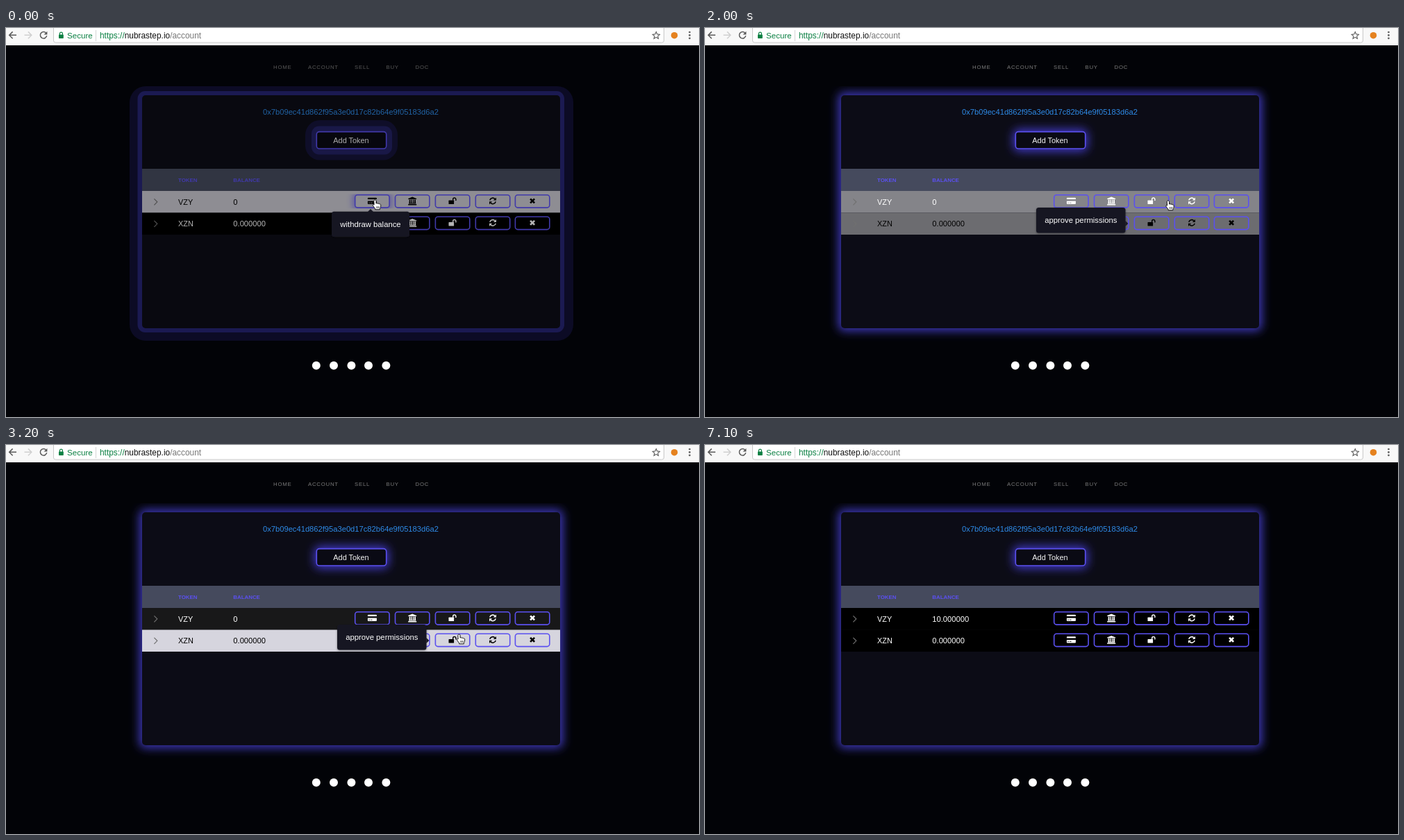
Write an HTML page that moves like this. It is 998x561 px and loops after 7550 ms.

```html
<!DOCTYPE html>
<html lang="en">
<head>
<meta charset="utf-8">
<title>Token account</title>
<style>
  html, body { margin: 0; width: 100%; height: 100%; overflow: hidden; background: #020307; }
  svg { display: block; width: 100%; height: 100%; }
  text { font-family: "Liberation Sans", Arial, sans-serif; white-space: pre; }
</style>
</head>
<body>
<svg id="stage" viewBox="0 0 998 561" xmlns="http://www.w3.org/2000/svg"></svg>
<script>
const LOOP = 7550;
const BLUE = '#5b50f0';
const BTN_X = [502.7, 560.5, 618.4, 676.3, 733.4];
const ROW_Y = [235, 266.5];

const txt = (x, y, s, size, fill, more = '') =>
  `<text x="${x}" y="${y}" font-size="${size}" fill="${fill}" ${more}>${s}</text>`;
const box = (x, y, w, h, r, fill, more = '') =>
  `<rect x="${x}" y="${y}" width="${w}" height="${h}" rx="${r}" fill="${fill}" ${more}/>`;
const dot = (x, y, r, fill) => `<circle cx="${x}" cy="${y}" r="${r}" fill="${fill}"/>`;
const line = (d, color, w, more = '') =>
  `<path d="${d}" fill="none" stroke="${color}" stroke-width="${w}" ${more}/>`;

// Icons are drawn around their own centre and take the row colour.
const ICONS = [
  `<path fill-rule="evenodd" d="M-5.6-4.6H5.6q.9 0 .9.9V3.7q0 .9-.9.9H-5.6q-.9 0-.9-.9V-3.7q0-.9.9-.9ZM-6.5-2.3V0H6.5V-2.3ZM-5.2 2.3v.9h1.8v-.9ZM-2.6 2.3v.9H.2v-.9Z"/>`,
  `<path d="M0-6 6-3.4V-2.4H-6V-3.4ZM-4.6-1.8h1.8V3h-1.8ZM-1.9-1.8h1.4V3h-1.4ZM.7-1.8h1.4V3H.7ZM3-1.8h1.8V3H3ZM-5.2 3.2H5.2V4.2H-5.2ZM-6 4.6H6V6H-6Z"/>`,
  `<rect x="-5.6" y="-.9" width="7.6" height="5.6" rx=".7"/>` +
    line('M.6-.6V-2.3a2.1 2.1 0 0 1 4.2 0V-.3', 'currentColor', 1.4),
  line('M-4.2-1A4.2 4.2 0 0 1 3.2-2.7M4.2 1A4.2 4.2 0 0 1-3.2 2.7', 'currentColor', 1.6) +
    `<path d="M5-5V-.9H.9ZM-5 5V.9H-.9Z"/>`,
  line('M-3-3 3 3M3-3-3 3', 'currentColor', 2.7)
];

function toolbar() {
  return box(0, 0, 998, 25, 0, '#f8f8f8') +
    box(68.5, -8, 879, 29, 3, '#fff', 'stroke="#c9c9c9"') +
    line('M15 10.3H5M9.6 5.4 4.7 10.3 9.6 15.2', '#5a5a5a', 1.5) +
    line('M26.5 10.3H36.5M31.9 5.4 36.8 10.3 31.9 15.2', '#d0d0d0', 1.5) +
    line('M57.6 7.2A4.7 4.7 0 1 0 58.7 11.2', '#5a5a5a', 1.5) +
    `<path d="M59.4 4.8V9.6H54.6Z" fill="#5a5a5a"/>` +
    box(76, 9.6, 6.8, 5.4, .7, '#0b8043') +
    line('M77.4 10V8.2a2 2 0 0 1 4 0V10', '#0b8043', 1.2) +
    txt(88, 14.6, 'Secure', 11.6, '#0b8043') +
    box(129, 3, 1, 16, 0, '#d5d5d5') +
    txt(135, 14.6, '<tspan fill="#0b8043">https://</tspan><tspan fill="#111">nubrastep.io</tspan>/account', 11.9, '#777') +
    line('M936.3 5.6l1.5 3.3 3.6.4-2.7 2.4.8 3.6-3.2-1.9-3.2 1.9.8-3.6-2.7-2.4 3.6-.4Z', '#5a5a5a', 1.1) +
    dot(962.5, 10.7, 4.8, '#e5821f') +
    [6, 10.4, 14.8].map(y => dot(984.5, y, 1.35, '#5a5a5a')).join('');
}

function nav() {
  return [[385, 'HOME'], [435, 'ACCOUNT'], [502, 'SELL'], [547.5, 'BUY'], [589.5, 'DOC']]
    .map(([x, s]) => txt(x, 58.7, s, 7.8, '#7b7b7b', 'letter-spacing=".75"')).join('');
}

function row(i, name, amount) {
  const y = ROW_Y[i], mid = y + 14.8;
  const buttons = BTN_X.map((x, k) =>
    box(x, y + 5.7, 49.4, 18.4, 3.6, 'none', `stroke="${BLUE}" stroke-width="1.6"`) +
    `<g transform="translate(${x + 24.7} ${mid - .4})" fill="currentColor">${ICONS[k]}</g>`).join('');
  return `<g id="row${i}">` +
    `<rect id="fill${i}" x="196" y="${y}" width="602" height="31.5"/>` +
    (i ? '' : `<g id="halo" clip-path="url(#cell)">
       <rect id="haloBlur" y="237" width="56" height="26" rx="6" fill="${BLUE}" opacity=".62" filter="url(#soft)"/>
       <rect id="haloCut" y="240.7" width="49.4" height="18.4" rx="3.6"/></g>`) +
    line(`M213.4 ${y + 11.3}l4.4 4.5-4.4 4.5`, '#707070', 1.2) +
    txt(248, y + 19.6, name, 10.9, 'currentColor') +
    txt(327.3, y + 19.6, amount, 11.2, 'currentColor', `id="amount${i}"`) +
    buttons + '</g>';
}

function card() {
  return box(196, 97, 602, 336, 5, '#0c0c16') +
    txt(370, 125.2, '0x7b09ec41d862f95a3e0d17c82b64e9f05183d6a2', 11.18, '#2e8ae6') +
    `<g class="bands">${box(431, 133, 133, 57.5, 21, '#15143a')}${box(440, 141.5, 116, 41, 11, '#232264')}</g>` +
    `<g class="glow">${box(444, 146, 107, 32, 8, '#4038c4', 'filter="url(#wide)"')}</g>` +
    box(447.3, 149.6, 100.4, 24.4, 4, '#0a0a14', `stroke="${BLUE}" stroke-width="1.6"`) +
    txt(497, 165.6, 'Add Token', 10.9, '#f4f4f4', 'text-anchor="middle"') +
    box(196, 203, 602, 32, 0, '#454a5d') +
    txt(248, 221.7, 'TOKEN', 7.9, BLUE, 'font-weight="bold"') +
    txt(327.3, 221.7, 'BALANCE', 7.9, BLUE, 'font-weight="bold"') +
    row(0, 'VZY', '0') + row(1, 'XZN', '0.000000');
}

function tip(id, x, y, w, label, arrow) {
  return `<g id="${id}">${box(x, y, w, 36.5, 3.5, '#191823', 'filter="url(#drop)"')}` +
    `<path d="${arrow}" fill="#191823"/>` +
    txt(x + w / 2, y + 22.2, label, 11.3, '#fff', 'text-anchor="middle"') + '</g>';
}

const hand = `<g id="hand"><path d="M-2.6-7c1.1 0 1.6.7 1.7 1.7V-1.9c.5-.7 2-.6 2.3.3.6-.7 1.9-.4 2.1.5 1.2-.4 2.2.2 2.2 1.5 0 2.6-.4 3.6-1.3 5V6.8H-2.4V5.6C-3.4 4.4-4.3 2.8-5.5 1.3-6.2.2-5 -.9-3.9 0L-4.2-5.3C-4.2-6.3-3.6-7-2.6-7Z"
  fill="#fff" stroke="#111" stroke-width="1"/>${line('M-.3 2.2V5M1.5 2.2V5M3.2 2.2V5', '#111', .7)}</g>`;
const arrow = `<path id="arrow" d="M-3-7V4.3L-.4 1.9 1.4 6.2 3.3 5.4 1.5 1.2H5.1Z" fill="#000" stroke="#fff" stroke-width="1"/>`;

document.getElementById('stage').innerHTML = `
  <defs>
    <filter id="soft" x="-60%" y="-120%" width="220%" height="340%"><feGaussianBlur stdDeviation="5"/></filter>
    <filter id="wide" x="-40%" y="-120%" width="180%" height="340%"><feGaussianBlur stdDeviation="7"/></filter>
    <filter id="drop" x="-10%" y="-30%" width="120%" height="160%"><feDropShadow dx="0" dy="1" stdDeviation="1.5" flood-opacity=".45"/></filter>
    <clipPath id="cell"><rect x="490" y="239.5" width="308" height="20.8"/></clipPath>
    <clipPath id="below"><rect y="84" width="998" height="477"/></clipPath>
  </defs>
  ${box(0, 0, 998, 561, 0, '#020307')}
  ${toolbar()}
  <g class="bands">${box(178, 84, 639, 367, 23, '#0c0b25')}${box(189.5, 91, 614.5, 348, 11, '#1b1a52')}</g>
  <g class="glow" clip-path="url(#below)">${box(192, 93, 610, 344, 8, '#3d37b8', 'filter="url(#wide)"')}</g>
  <g id="page">${nav()}${card()}</g>
  ${[446.8, 472, 497.4, 522, 547.4].map(x => dot(x, 486.8, 6, '#fff')).join('')}
  ${tip('withdraw', 469, 264.8, 112, 'withdraw balance', 'M521 265l4-4 4 4Z')}
  ${tip('approve', 477, 227.5, 128.5, 'approve permissions', 'M605.3 246.4l4 4-4 4Z')}
  <g id="cursor">${hand}${arrow}</g>`;

// Each step keeps what the one before it set. on: hovered row, a/b: row brightness.
const STEPS = [
  [0, { x: 534, y: 255, pose: 'hand', on: 0, a: .84, b: 0, tip: 'withdraw', tipY: 0, btn: 0, dim: 1, amount: '0' }],
  [150, { dim: .68, a: .92 }],
  [300, { dim: .36, a: 1 }],
  [500, { dim: .12 }],
  [760, { dim: 0 }],
  [1110, { x: 592, y: 256, tip: '', btn: 1 }],
  [1320, { x: 649, tip: 'approve', btn: 2 }],
  [1500, { x: 655, y: 257 }],
  [1650, { x: 661 }],
  [1850, { x: 667, y: 258 }],
  [2000, { x: 669.5, y: 256, on: 1, a: .555, b: .455, tipY: 31.6, btn: -1 }],
  [2150, { x: 667, on: 0, a: 1, b: 0, tipY: 0, btn: 2 }],
  [2300, { x: 661, y: 270, on: 1, a: .5, b: .5, tipY: 31.6, btn: -1 }],
  [2450, { x: 654, y: 266, on: 0, a: .8, b: .2, tipY: 0, btn: 2 }],
  [2600, { x: 649, y: 257, a: 1, b: 0 }],
  [2900, { x: 648, y: 276, pose: 'arrow', tip: '' }],
  [3050, { x: 650, y: 286, pose: 'hand', on: 1, a: .5, b: .5, tip: 'approve', tipY: 31.6, btn: -1 }],
  [3200, { x: 655, y: 280, a: .1, b: .9 }],
  [3350, { x: 659, y: 264, on: 0, a: .6, b: .4, tipY: 0, btn: 2 }],
  [3500, { x: 662, y: 257, a: 1, b: 0 }],
  [4100, { x: 668, y: 257 }],
  [4250, { x: 680, tip: '', btn: 3 }],
  [4400, { x: 691 }],
  [4550, { x: 698 }],
  [4700, { x: 701, y: 257 }],
  [5000, { x: 701.5, y: 257.5 }],
  [5900, { amount: '10.000000' }],
  [6500, { x: 712, y: 270, on: -1, a: .6, btn: -1 }],
  [6650, { x: 757, y: 336, a: .1 }],
  [6800, { x: 838, y: 438, a: 0 }],
  [6950, { x: 930, y: 538 }],
  [7100, { pose: '' }]
];
let last = {};
const states = STEPS.map(([at, set]) => (last = { ...last, ...set, at }));

const $ = id => document.getElementById(id);
const show = (el, on) => { el.style.display = on ? '' : 'none'; };
const tint = k => `rgb(${[238, 237, 247].map(c => Math.round(c * k)).join()})`;
const fade = (cls, k) => document.querySelectorAll(cls).forEach(el => { el.style.opacity = k; });

function paint(s) {
  $('page').style.filter = s.dim ? `brightness(${1 - .29 * s.dim})` : 'none';
  fade('.bands', s.dim);
  fade('.glow', 1 - s.dim);
  [s.a, s.b].forEach((k, i) => {
    $('fill' + i).setAttribute('fill', tint(k));
    $('row' + i).style.color = s.on === i ? '#000' : '#fff';
  });
  show($('halo'), s.btn >= 0);
  if (s.btn >= 0) {
    $('haloBlur').setAttribute('x', BTN_X[s.btn] - 3.3);
    $('haloCut').setAttribute('x', BTN_X[s.btn]);
    $('haloCut').setAttribute('fill', tint(s.a));
  }
  $('amount0').textContent = s.amount;
  show($('withdraw'), s.tip === 'withdraw');
  show($('approve'), s.tip === 'approve');
  $('approve').setAttribute('transform', `translate(0 ${s.tipY})`);
  show($('hand'), s.pose === 'hand');
  show($('arrow'), s.pose === 'arrow');
  $('cursor').setAttribute('transform', `translate(${s.x} ${s.y})`);
}

const start = performance.now();
let shown = null;
function tick() {
  const t = (performance.now() - start) % LOOP;
  const s = states.filter(st => st.at <= t).pop();
  if (s !== shown) paint(shown = s);
  requestAnimationFrame(tick);
}
tick();
</script>
</body>
</html>
```
